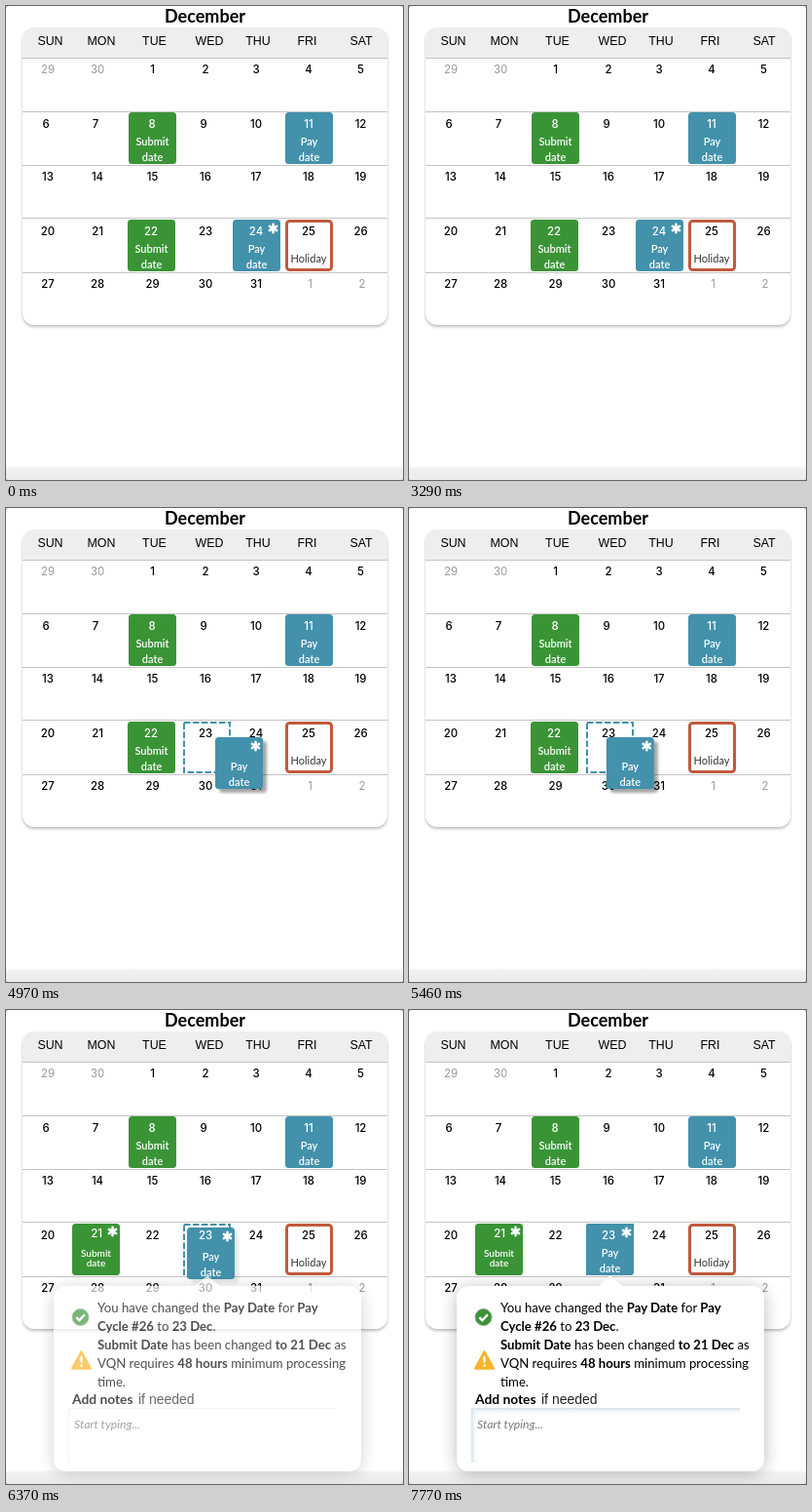
An HTML page that plays this animation: 408 by 486 pixels, repeating every 7840 ms.

```html
<!DOCTYPE html>
<html lang="en">
<head>
<meta charset="utf-8">
<title>December calendar</title>
<style>
  html, body { margin: 0; width: 100%; height: 100%; overflow: hidden; background: #b4b4b4; }
  svg { display: block; width: 408px; height: 486px; font-family: Lato, "Open Sans", sans-serif; }
  .mid { text-anchor: middle; }
  .head { font: 12.4px "Liberation Sans", Arial, sans-serif; fill: #000; }
  .day { font: 500 11.4px Inter, sans-serif; fill: #000; }
  .off { fill: #999; font-weight: 400; }
  .on { fill: #fff; }
  .label { font-size: 11px; font-weight: 600; fill: #fff; }
  .small { font-size: 10px; }
  .body { font-size: 13.15px; fill: #000; }
  .b { font-weight: 700; }
</style>
</head>
<body>
<svg id="stage" viewBox="0 0 408 486">
  <defs>
    <linearGradient id="foot" x2="0" y2="1">
      <stop stop-color="#fff"/><stop offset=".25" stop-color="#f1f1f1"/><stop offset="1" stop-color="#eaeaea"/>
    </linearGradient>
    <linearGradient id="inTop" x2="0" y2="1">
      <stop stop-color="#d3e2eb"/><stop offset="1" stop-color="#fff" stop-opacity="0"/>
    </linearGradient>
    <linearGradient id="inLeft">
      <stop stop-color="#d3e2eb"/><stop offset="1" stop-color="#fff" stop-opacity="0"/>
    </linearGradient>
    <filter id="soft" x="-20%" y="-20%" width="140%" height="140%"><feGaussianBlur stdDeviation="1.6"/></filter>
    <filter id="wide" x="-20%" y="-20%" width="140%" height="140%"><feGaussianBlur stdDeviation="9"/></filter>
    <clipPath id="sheet"><rect x="17" y="22" width="375" height="305" rx="12"/></clipPath>
  </defs>

  <rect width="408" height="486" rx="3" fill="#fff"/>
  <rect y="471" width="408" height="15" rx="3" fill="url(#foot)"/>
  <text class="mid b" x="204.5" y="17" font-size="18">December</text>

  <rect x="17" y="24" width="375" height="305" rx="12" fill="#000" opacity=".25" filter="url(#soft)"/>
  <g clip-path="url(#sheet)">
    <rect x="17" y="22" width="375" height="305" fill="#fff"/>
    <rect x="17" y="22" width="375" height="31" fill="#eee"/>
    <path d="M17 53.5h375M17 108.5h375M17 163.5h375M17 217.5h375M17 273.5h375" stroke="#c4c4c4"/>
  </g>
  <g id="days"></g>
  <g id="cards"></g>

  <rect x="288.5" y="220.5" width="46" height="50" rx="3" fill="none" stroke="#c05a3c" stroke-width="3"/>
  <text class="mid" x="311" y="263" font-size="11" fill="#333">Holiday</text>

  <rect id="slot" x="183" y="220" width="47" height="51" fill="none" stroke="#4391ab" stroke-width="2" stroke-dasharray="6.5 2.5"/>
  <g id="drag"></g>
  <text id="from" class="day on mid" x="257" y="235">24</text>
  <text id="to" class="day on mid" x="205" y="235">23</text>

  <g id="pop">
    <rect x="49" y="285" width="316" height="190" rx="14" opacity=".27" filter="url(#wide)"/>
    <path d="M61 283H195L207 272L219 283H353a12 12 0 0 1 12 12V461a12 12 0 0 1-12 12H61a12 12 0 0 1-12-12V295a12 12 0 0 1 12-12z" fill="#fff"/>
    <circle cx="76.5" cy="315" r="8.5" fill="#3a9436" stroke="#8aa889"/>
    <path d="M72.3 315.2l3 3l5.6-6" fill="none" stroke="#fff" stroke-width="2.4"/>
    <path d="M77.5 350.5L86.8 367.5H68.2z" fill="#f6b52c" stroke="#f6b52c" stroke-width="2.5" stroke-linejoin="round"/>
    <path d="M77.5 355v6.5M77.5 363.6v2.2" stroke="#fff" stroke-width="2.2"/>
    <g id="message"></g>
    <text x="68" y="404" font-size="13.8" class="b">Add notes</text>
    <text x="136" y="404" font-size="14" fill="#222" font-family="Liberation Sans, Arial, sans-serif">if needed</text>
    <path d="M64.5 464V408.5H340" fill="none" stroke="#eee"/>
    <g id="inset">
      <rect x="64" y="408" width="276" height="8" fill="url(#inTop)"/>
      <rect x="64" y="408" width="7" height="56" fill="url(#inLeft)"/>
    </g>
    <text x="70" y="429" font-size="12.2" font-style="italic" fill="#777">Start typing...</text>
  </g>
</svg>
<script>
const LOOP = 7840, STEP = 70;
const GREEN = '#3a9436', BLUE = '#4391ab';
const $ = id => document.getElementById(id);

function text(x, y, str, cls) {
  return `<text class="${cls}" x="${x}" y="${y}">${str}</text>`;
}

function star(x, y) {
  const arms = [0, 60, 120].map(a =>
    `<path d="M0-4.2V4.2" transform="rotate(${a})"/>`).join('');
  return `<g transform="translate(${x} ${y})" stroke="#fff" stroke-width="2.5" stroke-linecap="round">${arms}</g>`;
}

function card(fill, word, num, small) {
  const cls = 'label mid' + (small ? ' small' : '');
  return `<rect width="49" height="53" rx="3.5" fill="${fill}"/>` +
    (num ? text(small ? 25 : 24, small ? 14 : 16, num, 'day on mid') : '') +
    text(24.5, 34, word, cls) + text(24.5, small ? 44 : 50, 'date', cls);
}

function place(x, y, inner, id = '') {
  return `<g id="${id}" transform="translate(${x} ${y})">${inner}</g>`;
}

// Calendar grid
const cols = [43, 94, 150.5, 205, 257, 311, 364.5];
const rows = [69, 125, 179, 235, 289];
const heads = [45.5, 98, 152.5, 209, 259, 309.5, 365];
let html = 'SUN MON TUE WED THU FRI SAT'.split(' ')
  .map((d, i) => text(heads[i], 40, d, 'head mid')).join('');
for (let i = 0; i < 35; i++) {
  const n = i < 2 ? 29 + i : i < 33 ? i - 1 : i - 32;
  const row = i / 7 | 0, off = i < 2 || i > 32;
  const dx = row === 1 && i < 11 ? -2 : row === 4 && i > 32 ? 1.5 : 0;
  html += text(cols[i % 7] + dx, rows[row], n, 'day mid' + (off ? ' off' : ''));
}
$('days').innerHTML = html;

$('cards').innerHTML =
  place(126, 109, card(GREEN, 'Submit', 8)) +
  place(287, 109, card(BLUE, 'Pay', 11)) +
  place(125, 219, card(GREEN, 'Submit', 22), 'old') +
  place(68, 219, card(GREEN, 'Submit', 21, true) + star(41.5, 8), 'new');

$('drag').innerHTML =
  '<rect id="shade" x="4" y="4" width="49" height="53" rx="4" opacity=".4" filter="url(#soft)"/>' +
  card(BLUE, 'Pay') + star(41.5, 9);

$('message').innerHTML = [
  'You have changed the *Pay Date* for *Pay',
  '*Cycle #26* to *23 Dec*.',
  '*Submit Date* has been changed *to 21 Dec* as',
  'VQN requires *48 hours* minimum processing',
  'time.'
].map((line, i) => text(94, 310 + 19 * i,
  line.split('*').map((s, k) => k % 2 ? `<tspan class="b">${s}</tspan>` : s).join(''), 'body')).join('');

// Each track: [time, value] pairs, linear between
const tracks = {
  x: [[3570, 233], [4340, 232], [4550, 229], [4970, 215], [5320, 205], [5700, 199], [6020, 197], [6090, 197], [6370, 186], [6510, 182]],
  y: [[3570, 219], [4340, 226], [4690, 232], [4970, 235], [6090, 235], [6370, 223], [6510, 219]],
  from: [[3570, 1], [3850, 0]],
  shade: [[3570, 0], [3850, .35], [6160, .35], [6440, 0]],
  slot: [[4620, 0], [4830, 1]],
  to: [[6160, 0], [6300, 1]],
  swap: [[6090, 0], [6300, 1]],
  pop: [[6160, 0], [6370, .68], [6510, 1]],
  inset: [[6370, 0], [6510, 1]]
};

function at(name, t) {
  const keys = tracks[name];
  if (t <= keys[0][0]) return keys[0][1];
  for (let i = 1; i < keys.length; i++) {
    const [t0, a] = keys[i - 1], [t1, b] = keys[i];
    if (t < t1) return a + (b - a) * (t - t0) / (t1 - t0);
  }
  return keys[keys.length - 1][1];
}

function draw(now) {
  const t = Math.floor(now % LOOP / STEP) * STEP;
  $('drag').setAttribute('transform', `translate(${at('x', t)} ${at('y', t)})`);
  for (const id of ['from', 'to', 'shade', 'slot', 'pop', 'inset']) $(id).setAttribute('opacity', at(id, t));
  $('old').setAttribute('opacity', 1 - at('swap', t));
  $('new').setAttribute('opacity', at('swap', t));
}

const start = performance.now();
function tick() {
  draw(performance.now() - start);
  requestAnimationFrame(tick);
}
tick();
</script>
</body>
</html>
```
